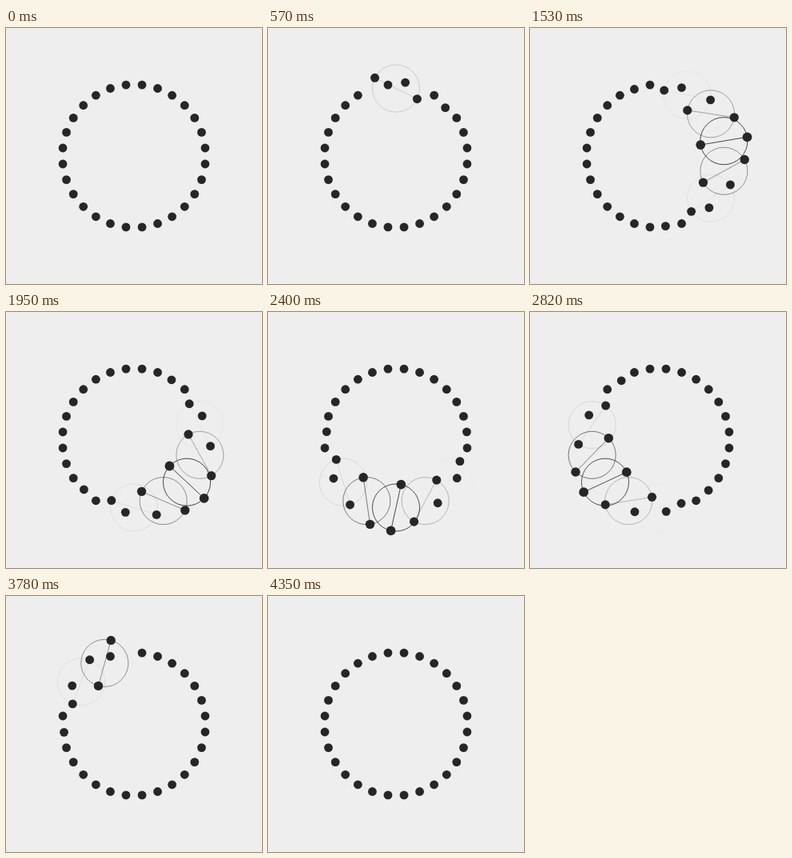
Write an HTML page with a canvas that moves like this. It is 320 px wide and 320 px high and loops after 5.17 s.

```html
<!DOCTYPE html>
<html lang="en">
<head>
<meta charset="utf-8">
<title>Swapping dots</title>
<style>
  html, body { margin: 0; width: 100%; height: 100%; overflow: hidden; background: #eee; }
  canvas { display: block; width: 320px; height: 320px; }
</style>
</head>
<body>
<canvas id="stage"></canvas>
<script>
const SIZE = 320, MID = SIZE / 2;
const LOOP = 5170, TICK = 30, REST = 4350;
const PAIRS = 14, START = 110, STAGGER = 207.5, TURN = 1566;
const RING = 89.5, STEP = Math.PI / PAIRS;
// Each pair sits three dots apart and turns about its midpoint.
const ORBIT = RING * Math.sin(1.5 * STEP);
const HUB = RING * Math.cos(1.5 * STEP);
const INK = '#262626';

const canvas = document.getElementById('stage');
const ctx = canvas.getContext('2d');
const ratio = window.devicePixelRatio || 1;
canvas.width = canvas.height = SIZE * ratio;
ctx.scale(ratio, ratio);

const clamp = x => Math.min(1, Math.max(0, x));
const ease = p => p * p / (p * p + (1 - p) * (1 - p));

function pairAt(i, time) {
  const p = time >= REST ? 1 : clamp((time - START - i * STAGGER) / TURN);
  const turn = ease(p);
  const place = 2 * i * STEP;
  const angle = place + Math.PI * turn;
  return {
    x: MID + HUB * Math.sin(place),
    y: MID - HUB * Math.cos(place),
    dx: ORBIT * Math.cos(angle),
    dy: ORBIT * Math.sin(angle),
    glow: Math.sin(Math.PI * turn) ** 2
  };
}

function drawGuide({ x, y, dx, dy, glow }) {
  if (glow < 0.005) return;
  ctx.globalAlpha = glow;
  ctx.beginPath();
  ctx.arc(x, y, ORBIT, 0, 2 * Math.PI);
  ctx.moveTo(x - dx, y - dy);
  ctx.lineTo(x + dx, y + dy);
  ctx.stroke();
}

function drawDots({ x, y, dx, dy, glow }) {
  for (const side of [-1, 1]) {
    ctx.beginPath();
    ctx.arc(x + side * dx, y + side * dy, 5.4 + 0.5 * glow, 0, 2 * Math.PI);
    ctx.fill();
  }
}

function draw(time) {
  const pairs = Array.from({ length: PAIRS }, (_, i) => pairAt(i, time));
  ctx.globalAlpha = 1;
  ctx.fillStyle = '#eee';
  ctx.fillRect(0, 0, SIZE, SIZE);
  ctx.strokeStyle = ctx.fillStyle = INK;
  ctx.lineWidth = 0.85;
  pairs.forEach(drawGuide);
  ctx.globalAlpha = 1;
  pairs.forEach(drawDots);
}

const begin = performance.now();
function frame() {
  const time = (performance.now() - begin) % LOOP;
  draw(Math.floor(time / TICK) * TICK);
  requestAnimationFrame(frame);
}
frame();
</script>
</body>
</html>
```
